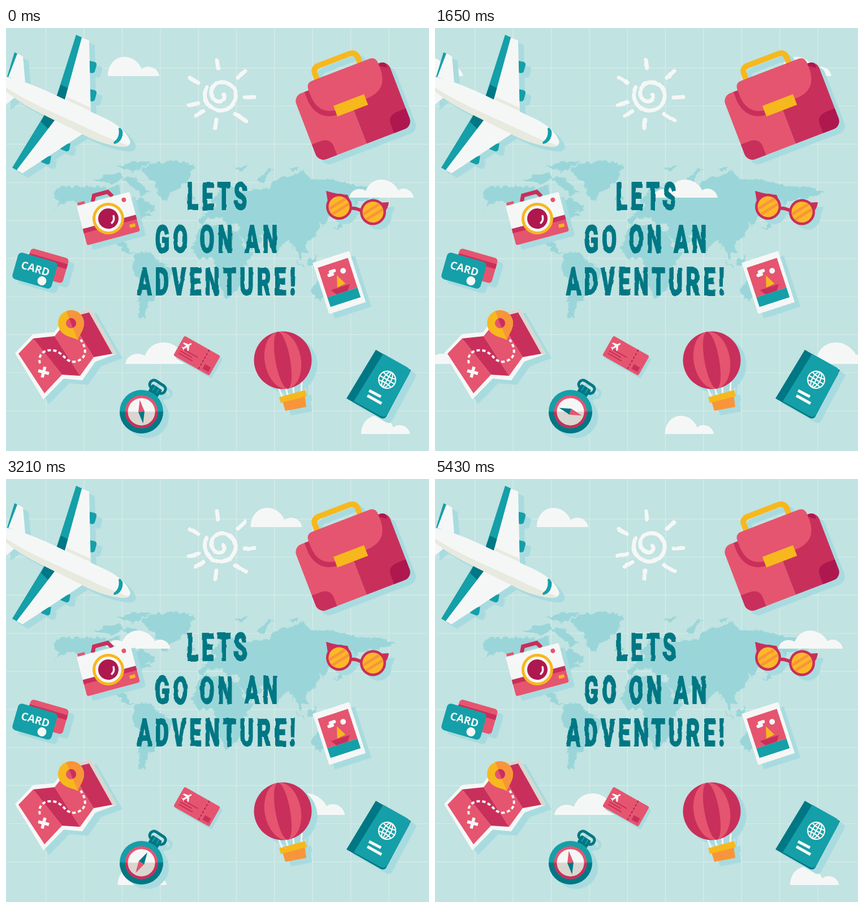
An HTML page for the animation above (5460 ms loop, 748 by 748 pixels).

```html
<!DOCTYPE html>
<html lang="en">
<head>
<meta charset="utf-8">
<title>Lets go on an adventure</title>
<style>
  html, body { margin: 0; width: 100%; height: 100%; overflow: hidden; background: #c1e3e1; }
  svg { display: block; width: 100vw; height: 100vh; }
  .item { filter: drop-shadow(10px 8px 0 #a8dbdf); }
  .white { fill: #f5f7f6; }
  .pink { fill: #e5556f; }
  .red { fill: #c92f5b; }
  .wine { fill: #ae184f; }
  .teal { fill: #159fa8; }
  .deep { fill: #007784; }
  .gold { fill: #f7b81e; }
  .orange { fill: #f8953a; }
  .beige { fill: #d9d6cf; }
  .line { fill: none; stroke: #f5f7f6; stroke-linecap: round; stroke-linejoin: round; }
  .title { font: 900 66px Roboto, "Liberation Sans", sans-serif; letter-spacing: 10.5px; text-anchor: middle;
           fill: #007784; stroke: #007784; stroke-width: 1.8px; }
  .card { font: 700 19px "Open Sans", "Noto Sans", sans-serif; text-anchor: middle; }
</style>
</head>
<body>
<svg viewBox="0 0 748 748">
  <defs>
    <filter id="boil" filterUnits="userSpaceOnUse" x="0" y="0" width="748" height="748" color-interpolation-filters="sRGB">
      <feTurbulence id="noise" type="fractalNoise" baseFrequency=".05" numOctaves="2"/>
      <feDisplacementMap in="SourceGraphic" scale="3.500" xChannelSelector="R" yChannelSelector="G"/>
    </filter>
    <filter id="coast" filterUnits="userSpaceOnUse" x="0" y="0" width="748" height="748" color-interpolation-filters="sRGB">
      <feTurbulence type="fractalNoise" baseFrequency=".1" numOctaves="3" seed="4"/>
      <feDisplacementMap in="SourceGraphic" scale="12" xChannelSelector="R" yChannelSelector="G"/>
    </filter>
    <clipPath id="caseClip"><rect x="-89" y="-62.500" width="178" height="125" rx="15"/></clipPath>
    <clipPath id="lower"><rect x="-40" width="80" height="40"/></clipPath>
    <path id="puff" d="M0 0C0-20 13-34 29-34S56-23 60-12C67-20 88-18 91 0Z"/>
    <path id="bank" d="M0 0C2-14 18-19 29-12C34-25 44-32 57-32S82-23 87-13C96-20 112-14 114 0Z"/>
  </defs>

  <rect width="748" height="748" fill="#c1e3e1"/>
  <path id="grid" stroke="#d4ecea" stroke-width="1.4"/>

  <g fill="#9ad6d9" filter="url(#coast)">
    <path d="M86 290 97 279 130 281 158 280 190 283 200 276 204 304 216 314 226 320 228 305 238 300 251 305 264 320 247 325 257 331 241 336 231 349 223 360 225 369 218 360 197 364 197 378 208 376 212 386 220 397 228 400 216 400 200 386 182 375 169 360 163 353 153 338 153 325 140 312 119 305 102 309 86 320 97 308 86 301Z"/>
    <path d="M228 400 238 393 257 399 273 415 298 426 291 442 277 463 262 481 249 492 244 510 247 516 236 510 234 488 241 452 231 441 223 424 225 415Z"/>
    <path d="M240 250 257 240 306 236 333 242 322 270 290 292 285 308 270 297 265 275 244 258ZM155 270 175 260 200 256 205 268 185 276ZM196 246 235 234 257 237 225 254ZM205 266 225 264 254 290 240 296 222 280ZM318 297 330 296 333 302 322 304ZM346 321 351 307 357 320Z"/>
    <path d="M340 347V336L353 334 348 327 358 322 368 316 371 311 363 305 375 292 396 278 420 290 445 284 466 283 472 270 502 262 525 252 539 266 583 268 616 280 660 281 690 291 660 300 624 305 621 312 611 324 609 308 588 307 575 316 583 327 564 342 562 352 554 342 552 356 547 371 531 378V395L523 397V413L515 397 508 384 498 375 485 389 480 401 472 378 463 369 448 367 455 376 430 392 412 364 414 349 399 347 391 347 384 338 375 334 360 336 347 349ZM405 247 430 243 415 254ZM445 272 458 254 472 249 455 272ZM500 247 520 243 512 252Z"/>
    <path d="M345 350 371 348 388 358 409 358 425 393 438 394 420 422V442L409 463 388 480 375 446 370 415 363 406 342 408 327 389 339 360ZM427 445 434 437 430 460ZM579 355 590 346 591 333 597 335 594 352ZM508 404 530 427 524 424ZM533 410 548 402 545 420 536 420ZM566 418 586 420 604 432 580 430ZM541 455 568 437 586 435 604 464 593 486 577 477 544 479Z"/>
  </g>

  <g filter="url(#boil)">
    <path id="spiral" class="line" stroke-width="7"/>
    <path class="line" stroke-width="7" d="M373 57 375 71M423 76 410 88M422 123 439 122M405 152 424 164M372 162 370 177M349 147 335 155M341 132 323 136M325 88 340 97"/>
  </g>

  <g id="clouds" class="white"></g>

  <g filter="url(#boil)">
    <g class="title" transform="translate(372) scale(.57 1)">
      <text x="7" y="321">LETS</text>
      <text x="5" y="397">GO ON AN</text>
      <text x="5" y="472">ADVENTURE!</text>
    </g>
  </g>

  <!-- plane -->
  <g class="item">
    <path class="teal" d="M148 58l9 2q4 2 3 6l-3 11q-2 4-9 2ZM148 108l9 2q4 2 3 6l-3 11q-2 4-9 2ZM80 226l-2 12q-2 4-6 3l-10-4 2-8ZM114 204l-2 11q-2 4-6 3l-10-4 4-8Z"/>
    <path class="teal" d="M15 43 22 46 10 90 2 86ZM124 12 135 17 108 132 89 122ZM11 247 20 252 100 165 70 150Z"/>
    <path class="deep" d="M97 100 113 108 108 132 89 122ZM70 150 92 160 78 182 62 166Z"/>
    <path class="white" d="M20 45 30 50 34 96 4 87ZM-2 108 20 119-2 137ZM134 17 147 22 150 155 103 130ZM19 251 29 257 139 185 90 158Z"/>
    <path class="white" d="M-5 86Q30 90 105 127L180 162Q214 180 220 202Q218 211 205 210Q180 208 150 195L60 150Q20 130-5 108Z"/>
    <path fill="#e8e9df" d="M-5 102Q25 122 65 141L150 180Q180 195 217 208Q213 211 205 210Q180 208 150 195L60 150Q20 130-5 108ZM108 122 150 141V147L106 127Z"/>
    <path class="teal" d="M201 176Q208 180 206 190Q203 203 192 205Q189 204 191 201Q202 193 199 178Z"/>
  </g>

  <!-- suitcase -->
  <g class="item"><g transform="translate(613.500 147) rotate(-21)">
    <path d="M-39-72V-86Q-39-97-27-97H29Q42-97 42-86V-72" fill="none" stroke="#f7b81e" stroke-width="10"/>
    <g clip-path="url(#caseClip)">
      <path class="pink" d="M-90-64H2V64H-90Z"/>
      <path class="red" d="M2-64H90V64H2Z"/>
      <path class="red" d="M-68-70V-45Q-64-3-20-3H5V-60ZM-90 29H-72Q-54 30-54 46V64H-90Z"/>
      <path class="wine" d="M60-64H76Q87-60 84-50L72-58ZM90 29H72Q54 30 54 46V64H90Z"/>
    </g>
    <path class="pink" d="M-60-63Q-60-76-48-76H60Q72-76 72-63V-50Q70-12 30-12H-20Q-58-12-60-50Z"/>
    <rect class="gold" x="-29" y="-21" width="58" height="20"/>
  </g></g>

  <!-- camera -->
  <g class="item"><g transform="translate(181 337) rotate(-15)">
    <path d="M-19-36 -14-46H11L17-36" fill="none" stroke="#c92f5b" stroke-width="7"/>
    <path class="pink" d="M-46-41H-33V-34H-46Z"/>
    <rect class="white" x="-48.500" y="-36" width="97" height="72" rx="3"/>
    <path class="pink" d="M-48.500 9H48.500V33Q48.500 36 45 36H-45Q-48.500 36-48.500 33Z"/>
    <path class="red" d="M-48.500 6H48.500V14H-48.500Z"/>
    <circle class="pink" cx="35" cy="-25" r="4"/>
    <path class="gold" d="M33 20H43V26H33Z"/>
    <circle class="gold" r="28"/><circle class="white" r="23"/><circle class="wine" r="18"/>
    <path class="line" stroke-width="3.500" d="M10-2Q10 6 4 9"/>
  </g></g>

  <!-- sunglasses -->
  <g class="item">
    <path class="red" d="M566 288Q585 294 604 295L611 312 570 313ZM634 307Q655 310 677 308Q676 319 668 327Z"/>
    <path d="M608 319Q620 318 630 324" fill="none" stroke="#c92f5b" stroke-width="6"/>
    <g id="lenses"></g>
  </g>

  <!-- cards -->
  <g class="item">
    <g transform="translate(72 420.500) rotate(16)"><rect class="pink" x="-35" y="-23" width="70" height="46" rx="6"/><path class="red" d="M-35-13H35V-4H-35Z"/></g>
    <g transform="translate(51 429) rotate(16)"><rect class="teal" x="-36" y="-24.500" width="72" height="49" rx="7"/><text class="card white" y="3">CARD</text><circle class="white" cx="17" cy="14" r="8"/></g>
  </g>

  <!-- folded map -->
  <g class="item">
    <path class="white" d="M16 575 48 541 85 538 110 505 150 496 196 576 158 590 135 623 102 620 66 657Z"/>
    <path class="beige" d="M110 505 150 496 196 576 188 577 147 503 112 512Z"/>
    <path class="pink" d="M22 576 48 549 99 613 68 646ZM86 545 112 512 155 582 131 615Z"/>
    <path class="red" d="M48 549 86 545 131 615 99 613ZM112 512 147 503 188 576 155 582Z"/>
    <path class="line" stroke-width="4" style="stroke-linecap:butt" stroke-dasharray="6 4" d="M60 593C55 575 72 566 88 571C105 578 106 592 122 590C143 586 144 568 132 551"/>
    <path class="line" stroke-width="5.500" style="stroke-linecap:butt" d="M57 606 76 611M69 599 64 618"/>
    <g transform="translate(115 522) rotate(-22)">
      <path class="gold" d="M0 32C-6 24-23 17-23 0A23 23 0 0 1 23 0C23 17 6 24 0 32Z"/>
      <path class="orange" d="M0 32V-23A23 23 0 0 1 23 0C23 17 6 24 0 32Z"/>
      <circle class="pink" r="9"/><path class="red" d="M0-9A9 9 0 0 1 0 9Z"/>
    </g>
  </g>

  <!-- compass -->
  <g class="item"><g transform="translate(239.500 678.500)">
    <g transform="rotate(33)">
      <rect x="-15" y="-60" width="30" height="15" rx="7" fill="none" stroke="#007784" stroke-width="5"/>
      <rect class="deep" x="-10" y="-52" width="20" height="16" rx="2"/>
      <path d="M-4-51V-42M4-51V-42" stroke="#159fa8" stroke-width="2"/>
    </g>
    <circle class="teal" r="38.500"/><circle class="deep" r="38.500" clip-path="url(#lower)"/>
    <circle class="pink" r="29"/><circle class="red" r="29" clip-path="url(#lower)"/>
    <circle class="white" r="24"/><circle class="beige" r="24" clip-path="url(#lower)"/>
    <g id="needle"><path class="deep" d="M-5.500 0 0-21 5.500 0Z"/><path class="pink" d="M-5.500 0 0 21 5.500 0Z"/></g>
  </g></g>

  <!-- ticket -->
  <g class="item" style="filter:drop-shadow(4px 5px 0 #a8dbdf)"><g transform="translate(337.500 579.500) rotate(29.500)">
    <rect class="pink" x="-36.500" y="-20" width="73" height="40" rx="3"/>
    <path d="M14-20V20" stroke="#ae184f" stroke-width="1.600" stroke-dasharray="4 3"/>
    <path d="M-30 2H3M-30 7H-6M-30 12H-2" stroke="#c92f5b" stroke-width="2"/>
    <path class="red" d="M20 6H32V15H20Z"/>
    <path class="white" transform="translate(-23 -7) rotate(-60)" d="M-8-1.500H-2L-5-8H-2L3-1.500H7Q10 0 7 1.500H3L-2 8H-5L-2 1.500H-8L-10 4V-4Z"/>
  </g></g>

  <!-- balloon -->
  <g class="item">
    <path class="line" stroke-width="3" d="M482 636 489 654M495 637 499 652M508 635 509 648M523 627 522 645"/>
    <path class="orange" d="M488 657 528 648 531 670 494 677Z"/>
    <path class="gold" d="M483 653 529 640 532 651 486 663Z"/>
    <g transform="translate(489.500 587.500) rotate(-10)">
      <circle class="red" r="51"/>
      <ellipse class="pink" rx="32" ry="51"/><ellipse class="red" rx="13" ry="51"/>
    </g>
  </g>

  <!-- passport -->
  <g class="item">
    <path class="deep" d="M654 569 716 605 672 688Q667 693 660 688L602 655Z"/>
    <path class="teal" d="M667 576 708 599Q717 604 713 612L674 683Q670 690 662 686L615 660Z"/>
    <g transform="translate(674 622) rotate(30)" class="line" stroke-width="2.200"><circle r="15"/><ellipse rx="7" ry="15"/><path d="M0-15V15M-15 0H15M-12-8Q0-4 12-8M-12 8Q0 4 12 8"/></g>
    <path class="line" stroke-width="5" style="stroke-linecap:butt" d="M642 641 663 652M639 650 664 664"/>
  </g>

  <!-- postcard -->
  <g class="item"><g transform="translate(589 449.500) rotate(-18)">
    <path class="white" d="M-34-47H34V48H-34Z"/>
    <path class="pink" d="M-28-36H28V19H-28Z"/><path class="teal" d="M-28 19H28V37H-28Z"/>
    <path class="line" stroke-width="6" d="M-9-22H-2M-13-17H-7"/>
    <circle class="white" cx="13" cy="-17" r="5"/>
    <path class="red" d="M-18 9H17L10 19H-11Z"/><path class="gold" d="M0-13 10 6-6 8Z"/>
  </g></g>
</svg>

<script>
const LOOP = 5460, STEP = 30;
const $ = id => document.getElementById(id);
const make = (tag, attrs, parent) => {
  const node = document.createElementNS("http://www.w3.org/2000/svg", tag);
  for (const key in attrs) node.setAttribute(key, attrs[key]);
  return parent.appendChild(node);
};

let lines = "";
for (let i = 0; i < 10; i++) {
  const p = 70.8 + i * 67.35;
  lines += `M${p} 0V748M0 ${p}H748`;
}
$("grid").setAttribute("d", lines);

// The curl opens quickly, then settles into a nearly round outer turn.
let curl = "";
for (let i = 0; i <= 60; i++) {
  const u = i / 60, a = u * 9.9, r = 4 + 25 * (1 - (1 - u) ** 2);
  curl += `${i ? "L" : "M"}${380.5 + r * Math.cos(a)} ${118 + r * Math.sin(a)}`;
}
$("spiral").setAttribute("d", curl);

for (const [x, y] of [[589, 316], [649, 325.5]]) {
  const lens = make("g", { transform: `translate(${x} ${y}) rotate(-32)` }, $("lenses"));
  make("circle", { r: 23, class: "red" }, lens);
  make("circle", { r: 18.5, fill: "#fdb827" }, lens);
  make("path", { d: "M-17-6H17M-17 5H17", stroke: "#f8953a", "stroke-width": 5 }, lens);
}

// Each cloud leaves to the left while its successor drifts in to the same spot.
const clouds = [["puff", 180, 85, 1], ["bank", 607, 300, 1], ["bank", 211, 594, 1.19], ["puff", 628, 718, 0.95]]
  .map(([shape, x, y, size]) => ({
    x, y, size,
    parts: [0, 1].map(() => make("use", { href: "#" + shape }, $("clouds")))
  }));

const swing = [[0, 172], [1020, 242], [2580, 358], [3200, 390], [3840, 360], [5430, 172], [LOOP, 172]];
function needleAngle(t) {
  const i = swing.findIndex(([time]) => time > t);
  const [t0, a0] = swing[i - 1], [t1, a1] = swing[i];
  return a0 + (a1 - a0) * (t - t0) / (t1 - t0);
}

function draw(t) {
  for (const { x, y, size, parts } of clouds) {
    const places = [x - 0.1341 * t, x + 0.1138 * (LOOP - STEP - t)];
    parts.forEach((part, i) => part.setAttribute("transform", `translate(${places[i]} ${y}) scale(${size})`));
  }
  $("needle").setAttribute("transform", `rotate(${needleAngle(t)})`);
  $("noise").setAttribute("seed", 1 + Math.floor(t / 120));
}

let start;
function tick(now) {
  start ??= now;
  draw(Math.floor((now - start) % LOOP / STEP) * STEP);
  requestAnimationFrame(tick);
}
draw(0);
requestAnimationFrame(tick);
</script>
</body>
</html>
```
